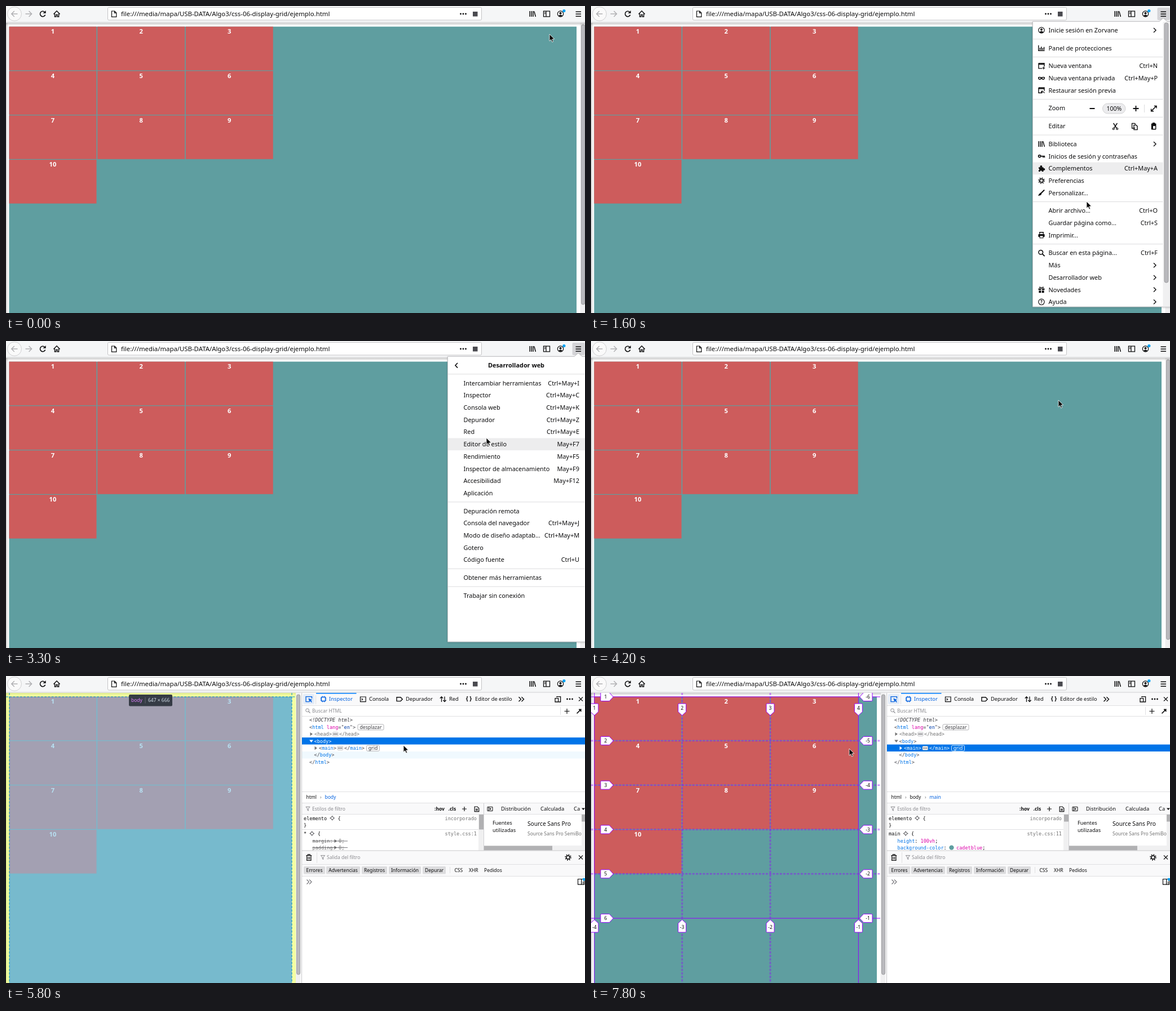
Animation, 1027 px wide and 545 px high, one loop 8 s. Source, as an HTML page:

```html
<!DOCTYPE html>
<html lang="es">
<head>
<meta charset="utf-8">
<title>Inspector de cuadrícula</title>
<style>
html, body { margin: 0; width: 100%; height: 100%; overflow: hidden; background: #fff; }
svg { display: block; width: 1027px; height: 545px; }
text { font-family: "Noto Sans", sans-serif; white-space: pre; }
.mono { font-family: "DejaVu Sans Mono", monospace; }
</style>
</head>
<body>
<svg id="stage" viewBox="0 0 1027 545" xmlns="http://www.w3.org/2000/svg"></svg>
<script>
const INK = '#0c0c0d', GREY = '#737373', BLUE = '#0060df', TAG = '#0074e8', PINK = '#dd00a9', LINE = '#e0e0e2';
const TEAL = '#5f9ea0', RED = '#cd5c5c', PURPLE = '#9400ff', DASH = 'stroke-dasharray="3.9 2.3"';
const PX = 156.6, PY = 78.8;

const range = (n, fn) => Array.from({ length: n }, (_, i) => fn(i)).join('');
const esc = s => s.replace(/&/g, '&amp;').replace(/</g, '&lt;');
const rect = (x, y, w, h, fill, extra = '') => `<rect x="${x}" y="${y}" width="${w}" height="${h}" fill="${fill}" ${extra}/>`;
const path = (d, w = 1.2, color = INK, extra = '') => `<path d="${d}" fill="none" stroke="${color}" stroke-width="${w}" ${extra}/>`;
const solid = (d, color = INK) => `<path d="${d}" fill="${color}"/>`;
const ring = (x, y, r, w = 1.2, color = INK) => `<circle cx="${x}" cy="${y}" r="${r}" fill="none" stroke="${color}" stroke-width="${w}"/>`;
const dot = (x, y, r, color = INK) => `<circle cx="${x}" cy="${y}" r="${r}" fill="${color}"/>`;
const at = (x, y, body) => `<g transform="translate(${x} ${y})">${body}</g>`;
const group = (id, body, extra = '') => `<g id="${id}" ${extra}>${body}</g>`;
// y is the middle of the line
const text = (x, y, s, size, color = INK, extra = '') =>
  `<text x="${x}" y="${y + size * .36}" font-size="${size}" fill="${color}" ${extra}>${esc(s)}</text>`;
const mono = (x, y, parts, extra = '') =>
  `<text class="mono" x="${x}" y="${y + 3}" font-size="8.53" ${extra}>` +
  parts.map(([s, c]) => `<tspan fill="${c}">${esc(s)}</tspan>`).join('') + '</text>';
const END = 'text-anchor="end"', MID = 'text-anchor="middle"', SEMI = 'font-weight="600"';
const dots = (x, y, r = 1.4) => [-4.5, 0, 4.5].map(d => dot(x + d, y, r)).join('');
const cross = (x, y, r = 3.5) => path(`M${x - r} ${y - r}l${2 * r} ${2 * r}m0 ${-2 * r}l${-2 * r} ${2 * r}`);
const plus = (x, y, r = 4.5, w = 1.2) => path(`M${x - r} ${y}h${2 * r}M${x} ${y - r}v${2 * r}`, w);

const windowIcon = path('M-5-4.8H5V1M1 4.5H-5V-4.8', 1.4) + path('M-5-3.2H5', 2);
const icon = {
  account: ring(0, 0, 5.2) + dot(0, -1.2, 2) + solid('M-3.6 3.6Q0-.6 3.6 3.6Q0 6 -3.6 3.6'),
  bars: path('M-5.2-5V4.6H5.6', 1.4) + path('M-2.6 3V-.5M-.2 3V-2.5M2.2 3V0M4.6 3V-2', 1.5),
  window: windowIcon + plus(3.8, 3.8, 2.4),
  mask: solid('M-6-1.6Q-4-3.2 0-1.6Q4-3.2 6-1.6Q6 3 3 3Q1 3 0 1.2Q-1 3-3 3Q-6 3-6-1.6') +
    dot(-3, .2, 1.2, '#fff') + dot(3, .2, 1.2, '#fff'),
  restore: windowIcon + path('M5 5Q5 1.8 0 2.4M1.8 .3L-.4 2.4L1.8 4.6'),
  library: path('M-4.8-5V5M-1.8-5V5M1-5V5M2.8-4.6L5.4 5', 1.5),
  key: ring(-3.4, 0, 2, 1.6) + path('M-1.4 0H6M3 0V2.6M5.4 0V2.6', 1.6),
  puzzle: rect(-5, -2, 8.6, 7.6, INK, 'rx=".6"') + dot(-.6, -3.2, 2) + dot(4.4, 1.6, 1.9) + dot(-.8, 5.2, 1.3, '#fff') + dot(-5, 1.6, 1.2, '#fff'),
  gear: ring(0, 0, 3, 1.5) + `<circle r="4.8" fill="none" stroke="${INK}" stroke-width="2" stroke-dasharray="1.6 2.17"/>`,
  brush: path('M5.2-5.2L-1.6 1.6', 2) + solid('M-2-.2L.4 2.2Q-2 5.6-6 5Q-4.4 2-2-.2'),
  printer: rect(-5.6, -1.8, 11.2, 5, INK, 'rx="1"') + path('M-3.2-2V-5H3.2V-2', 1.4) + rect(-3, 1, 6, 4, '#fff', `stroke="${INK}"`),
  search: ring(-1.2, -1.2, 3.8, 1.5) + path('M1.6 1.6L5.6 5.6', 1.9),
  gift: rect(-5.4, -2.2, 4.7, 2.8, INK) + rect(.7, -2.2, 4.7, 2.8, INK) + rect(-4.6, 1.6, 3.9, 4, INK) +
    rect(.7, 1.6, 3.9, 4, INK) + path('M0-2.6Q-4-6-3.4-3.2M0-2.6Q4-6 3.4-3.2', 1.4),
  help: ring(0, 0, 5.2) + text(0, 0, '?', 8, INK, MID + ' ' + SEMI),
};
const chevron = (x, y) => path(`M${x - 2} ${y - 4}l4 4l-4 4`, 1.4);

/* browser toolbar */
const toolbar = rect(0, 0, 1027, 29.5, '#f5f6f7') + path('M0 29H1027', 1, '#cfcfd1') +
  dot(15, 14, 12.4, '#fafafa') + ring(15, 14, 12.4, 1, '#cfcfd1') +
  path('M20.5 14H10M14.8 9L9.8 14L14.8 19', 1.5, '#b0b0b3') +
  path('M34.5 14H45M40.6 9L45.6 14L40.6 19', 1.5, '#b0b0b3') +
  path('M69 11.2A4.7 4.7 0 1 0 69.6 15.6', 1.6) + solid('M70.6 8V13H65.6Z') +
  path('M84.4 14.4L90 8.8L95.6 14.4M86.4 13.6V19H88.8V15.4H91.2V19H93.6V13.6', 1.4) +
  rect(180.5, 2.5, 663, 22.5, '#fff', 'stroke="#c4c4c6" rx="2"') +
  path('M187.5 9H192.6L195.8 12.2V19.4H187.5ZM192.4 9V12.4H195.6', 1.2) +
  text(204, 14.2, 'file:///media/mapa/USB-DATA/Algo3/css-06-display-grid/ejemplo.html', 11.36) +
  dots(811, 14) + rect(828, 10, 8.5, 8.5, '#4a4a4f') +
  at(934, 14, icon.library) +
  path('M953.5 9.2H964.5V18.8H953.5ZM958 9.2V18.8', 1.3) + path('M955 11.6H957M955 13.6H957', 1) +
  at(983.5, 14, icon.account) + dot(989.8, 8.6, 2.6, '#00a2f4') +
  rect(1004.5, 3, 22, 22, '#d4d4d7', 'id="menuButton" rx="2"') +
  path('M1010.5 10.2H1020M1010.5 14.2H1020M1010.5 18.2H1020', 1.4);

/* page */
const cells = range(10, i => {
  const x = 5.5 + i % 3 * PX, y = 36.6 + Math.floor(i / 3) * PY;
  return rect(x, y, 155, 77.6, RED) + text(x + 77.5, y + 8.4, String(i + 1), 11.2, '#fff', MID + ' ' + SEMI);
});
const scrollbar = x => rect(x, 30, 9, 515, '#f0f0f1') + rect(x + 2, 33, 6.2, 497, '#b9b9bd', 'rx="3" stroke="#939396" stroke-width=".8"');
const pageView = (id, right) => group(id,
  rect(0, 30, right + 15, 515, '#fff') + rect(5.5, 36.6, right - 5.5, 509, TEAL) + cells + scrollbar(right + 6.5));
const shade = rect(0, 30, 4, 515, 'url(#sideShade)') + rect(0, 30, 1027, 5, 'url(#topShade)', 'id="topEdge"');

/* grid lines and numbers */
const rowY = i => Math.max(37, 36.1 + PY * i), colX = i => Math.max(6, 5.2 + 156.4 * i);
const tagShape = (x, y, turn, label) => {
  const [dx, dy] = [[-14.5, 0], [16.5, 0], [0, -13.5], [0, 16]][turn];
  const d = [
    `M${x - 22} ${y - 7.5}h14l7 7.5l-7 7.5h-14q-1.5 0-1.5-1.5v-12q0-1.5 1.5-1.5Z`,
    `M${x + 23} ${y - 7.5}h-14l-7 7.5l7 7.5h14q1.5 0 1.5-1.5v-12q0-1.5-1.5-1.5Z`,
    `M${x - 7} ${y - 20}v13l7 6.5l7-6.5v-13q0-1.5-1.5-1.5h-11q-1.5 0-1.5 1.5Z`,
    `M${x - 7} ${y + 23.5}v-14.5l7-6.5l7 6.5v14.5q0 1.5-1.5 1.5h-11q-1.5 0-1.5-1.5Z`][turn];
  return `<path d="${d}" fill="#fff" stroke="${PURPLE}" stroke-width="1"/>` + text(x + dx, y + dy, label, 8.5, INK, MID);
};
const gridLine = (vertical, p, edge) => {
  const seg = v => vertical ? `M${v} 30V545` : `M0 ${v}H513`;
  return edge ? path(seg(p), 1, PURPLE) : path(seg(p - .8) + seg(p + .8), .8, PURPLE, DASH + ' opacity=".75"');
};
const gridView = group('gridLines',
  range(6, i => gridLine(false, rowY(i), i % 5 === 0)) + range(4, i => gridLine(true, colX(i), i % 3 === 0)) +
  range(6, i => tagShape(40.5, rowY(i), 0, String(i + 1)) + tagShape(474.5, rowY(i), 1, String(i - 6))) +
  range(4, i => tagShape(colX(i), 70.5, 2, String(i + 1)) + tagShape(colX(i), 430, 3, String(i - 4))),
  'clip-path="url(#pageClip)"');

/* element highlighter */
const tip = (x, w, name, kind) => rect(x, 33, w, 20.5, '#353b45', 'rx="2"') +
  text(x + 4, 43, name, 8.5, '#df80ff') + path(`M${x + 29} 37.5v11`, .8, '#6d727a') +
  text(x + 34, 43, '647 × 666', 8.5, '#cdd9e4') +
  (kind ? path(`M${x + 77.5} 37.5v11`, .8, '#6d727a') + text(x + 82.5, 43, kind, 8.5, '#a9aeb5') : '');
const guides = path('M6 30V545M507 30V545M0 37H514', 1, '#0088cc', DASH);
const boxFill = `<g opacity=".6">${rect(6, 37, 501, 508, '#87ceeb')}</g>`;
const bodyMark = group('bodyMark',
  '<path d="M0 30H514V545H507V37H6V545H0Z" fill="#edff64" opacity=".6"/>' + boxFill + guides + tip(218, 77, 'body'));
const mainMark = group('mainMark', boxFill + guides + tip(161.5, 190, 'main', 'Contenedor de cuadricula'));

/* developer tools */
const target = (x, y, color = INK) => ring(x, y, 2.6, 1, color) + path(`M${x - 4.4} ${y}h2.4m4 0h2.4M${x} ${y - 4.4}v2.4m0 4v2.4`, 1, color);
const picker = color => path('M538 45.6H532V36.6H542.5V40', 1.3, color) + solid('M536.4 39.4L543.6 42.4L540.6 43.3L543 46L541.8 47L539.6 44.4L538.4 46.6Z', color);
const funnel = (x, y) => path(`M${x - 3.6} ${y - 3.4}h7.2l-2.8 3.4v3.6l-1.6-1v-2.6Z`, 1, '#8a8a8f');
const tabs = [[573, 'Inspector'], [644, 'Consola'], [709, 'Depurador'], [786, 'Red'], [832, 'Editor de estilo']];
const toolHead = rect(524, 30, 503, 515, '#fff') + path('M524.5 30V545', 1, '#c8c8ca') + rect(525, 30, 502, 22, '#f9f9fa') +
  path('M525 52.5H1027M525 71.5H1027M983.5 55V69', 1, LINE) + rect(550, 30, 71.5, 1.6, '#0a84ff') + path('M549.5 34V50', 1, LINE) +
  tabs.map(([x, s], i) => text(x, 41, s, 9.35, i ? INK : BLUE)).join('') +
  path('M559.5 37.5h7v7h-7Z', 1.4, BLUE) + path('M557.5 39.5h2m-2 3h2m7-3h2m-2 3h2M561.5 35.5v2m3-2v2m-3 7v2m3-2v2', 1, BLUE) +
  path('M628.5 37h9.6v8.6h-9.6ZM630.6 39.6l2 1.8l-2 1.8', 1.2) +
  path('M693 37.8h7l3.2 3.4l-3.2 3.4h-7Z', 1.4) +
  path('M772.5 46V37M769.8 39.6L772.5 36.8L775.2 39.6M778 36.4V45.4M775.3 42.8L778 45.6L780.7 42.8', 1.3) +
  text(821, 40.5, '{ }', 10, INK, MID + ' ' + SEMI) +
  path('M909.5 37.2l4 4l-4 4m5-8l4 4l-4 4', 1.4) +
  path('M977 38V36.6H983.6V46H980.4M974 39.6h5.6v6.4h-5.6Z', 1.3) + dots(1000, 41) + cross(1019.5, 41) +
  ring(534.6, 60.8, 2.9, 1, '#8a8a8f') + path('M536.8 63L539.6 65.8', 1.2, '#8a8a8f') +
  text(543, 62, 'Buscar HTML', 8.5, '#8a8a8f') + plus(995, 62.5) +
  path('M1012.5 66.5L1018 61', 1.6) + path('M1016.4 58.8l4 4M1018.4 60.8l2-2', 2);

const paneBar = rect(525, 0, 502, 105, '#fff') + path('M525 .5H1027M525 20.5H1027M525 40.5H1027', 1, LINE) +
  rect(525, 21, 502, 19, '#f9f9fa') + path('M847.5 21V105', 1, '#d0d0d3') +
  funnel(535.5, 30.6) + text(543, 30.6, 'Estilos de filtro', 8.5, '#8a8a8f') +
  text(760, 30.6, ':hov', 8.5, INK, SEMI) + text(784.5, 30.6, '.cls', 8.5, INK, SEMI) + plus(813, 31, 4) +
  path('M831.2 27H836L838.8 29.8V35.6H831.2ZM833 31.4h4m-4 2h4', 1.2) +
  path('M854 27.5h9v7h-9ZM856.4 27.5v7', 1) + solid('M858 29l3 2l-3 2Z') +
  text(878, 30.8, 'Distribución', 9.3) + text(948, 30.8, 'Calculada', 9.3) + text(1007, 30.8, 'Ca', 9.3) +
  rect(1019.5, 22, 8, 17, '#f9f9fa') + solid('M1021 29.4H1027L1024 33Z');

const emptyPane = group('emptyPane', at(0, 440.5, paneBar) +
  text(863, 492, 'No se usaron fuentes en el elemento act', 9.3, INK, 'font-style="italic"') +
  rect(848, 536.5, 179, 9, '#f0f0f1') + rect(848, 537, 135.5, 8, '#b1b1b3'));

const console_ = rect(525, 310, 502, 235, '#fff') + rect(525, 310.5, 502, 45, '#f9f9fa') +
  path('M525 310H1027', 1, '#c8c8ca') + path('M525 334.5H1027M525 355.5H1027M551.5 313V332', 1, LINE) +
  path('M532.4 318.6h9.8M535.4 318.4v-1.6h3.8v1.6M533.6 319v8.4h7.4v-8.4M536 321v4.6m2.6-4.6v4.6', 1.2) +
  funnel(562, 322) + text(569, 322, 'Salida del filtro', 8.5, '#8a8a8f') + at(997, 322, icon.gear) + cross(1019.5, 322) +
  [[528, 38, 'Errores'], [568, 60, 'Advertencias'], [631, 45, 'Registros'], [679, 57, 'Información'], [739, 41, 'Depurar']]
    .map(([x, w, s]) => rect(x, 338, w, 13.5, '#dcdcde', 'rx="1.5"') + text(x + w / 2, 344.6, s, 8.5, INK, MID)).join('') +
  path('M787.5 339V350', 1, LINE) + text(795.5, 344.6, 'CSS', 8.5) + text(821, 344.6, 'XHR', 8.5) + text(848, 344.6, 'Pedidos', 8.5);

const filledPane = group('filledPane', at(0, 205, paneBar) +
  text(532.5, 215.4, 'html', 8.5) + text(557, 215.4, '›', 8.5, GREY) + rect(838, 246, 9, 64, '#f0f0f1') +
  rect(1021, 246, 6, 55, '#f0f0f1') + rect(1021, 246, 6, 12.5, '#b1b1b3') +
  rect(848, 301, 179, 9, '#f0f0f1') + rect(848, 301.5, 121, 8, '#b1b1b3') + console_);
const fontsInfo = group('fontsInfo', text(863, 260.6, 'Fuentes', 9.3) + text(863, 273.6, 'utilizadas', 9.3) +
  text(925, 262, 'Source Sans Pro', 10.2) +
  `<g clip-path="url(#fontClip)">${text(925, 279.8, 'Source Sans Pro SemiBold', 8.45, GREY)}</g>` +
  path('M533.5 361.5l4 4l-4 4m4.5-8l4 4l-4 4', 1.2, '#75757a') +
  path('M1014.5 360.5h11v9.6h-11ZM1020.6 360.5v9.6M1022.4 366h2m-2 2h2', 1.2) + dot(1025, 361, 2.4, '#00a2f4'));

const rowAt = i => 78.2 + 12.45 * i;
const tag = (s, color) => s.split(/(<\/?|>)/).filter(Boolean).map(p => [p, color || (/[<>]/.test(p) ? '#45454d' : TAG)]);
const badge = (x, y, w, s, fill, ink, edge) =>
  rect(x, y - 4.8, w, 10, fill, `rx="2" stroke="${edge}" stroke-width=".8"`) + text(x + w / 2, y, s, 8.6, ink, MID);
const more = (x, y) => rect(x, y - 3.4, 9.6, 7, '#ececee', 'rx="1.5" stroke="#b1b1b3" stroke-width=".6"') +
  [2.3, 4.8, 7.3].map(d => dot(x + d, y, .8)).join('');
const twisty = (x, y, open, color = GREY) => solid(open ? `M${x - 3.4} ${y - 2}h6.8l-3.4 4.4Z` : `M${x - 2} ${y - 3.2}v6.4l4.4-3.2Z`, color);
const selector = (y, name, src) => mono(528, y, [[name, INK]]) + target(534 + name.length * 5.13 + 3.6, y - .4, '#55555a') +
  mono(528 + name.length * 5.13 + 19.5, y, [['{', INK]]) + mono(835, y, [[src, GREY]], END);
const struck = (y, name) => mono(543.5, y, [[name + ':', GREY]]) + twisty(584.5, y, false) + mono(590, y, [['0;', GREY]]) + path(`M543.5 ${y}H606`, .8, '#55555a');

const tree = (id, main) => {
  const y = rowAt, pickedRow = main ? 4 : 3, white = i => i === pickedRow && '#fff';
  return group(id,
    rect(525, y(pickedRow) - 6.4, 502, 12.4, TAG) + (main ? '' : rect(525, y(5) - 6.4, 502, 12.4, '#f0f9fe')) +
    mono(538, y(0), [['<!DOCTYPE html>', '#38383d']], 'font-style="italic"') +
    mono(538, y(1), [['<', '#45454d'], ['html', TAG], [' lang', PINK], ['="', '#45454d'], ['en', '#003eaa'], ['">', '#45454d']]) +
    badge(624, y(1), 46, 'desplazar', '#fff', '#38383d', '#a0a0a4') +
    twisty(541.5, y(2)) + mono(547, y(2), tag('<head>', GREY)) + mono(591, y(2), tag('</head>', GREY)) + more(579.5, y(2)) +
    twisty(541.5, y(3), true, white(3) || GREY) + mono(546.5, y(3), tag('<body>', white(3))) +
    twisty(549.5, y(4), false, white(4) || GREY) + mono(555, y(4), tag('<main>', white(4))) + more(588, y(4)) +
    mono(600, y(4), tag('</main>', white(4))) +
    (main ? '' : badge(639.5, y(4), 23, 'grid', '#fff', '#38383d', '#a0a0a4')) +
    mono(546.5, y(5), tag('</body>')) + mono(538, y(6), tag('</html>')) +
    text(565.5, 215.4, 'body', 8.5, main ? INK : BLUE) + (main ? text(592, 215.4, '›', 8.5, GREY) + text(600.5, 215.4, 'main', 8.5, BLUE) : '') +
    rect(839, 246, 8, main ? 12.5 : 26.5, '#b1b1b3') +
    selector(252.6, 'elemento', 'incorporado') + mono(528, 265, [['}', INK]]) + path('M525 272.5H838', 1, LINE) +
    `<g clip-path="url(#ruleClip)">` + (main
      ? selector(280, 'main', 'style.css:11') + mono(543.5, 293, [['height', TAG], [': ', INK], ['100vh', PINK], [';', INK]]) +
        mono(543.5, 304.6, [['background-color', TAG], [':', INK]]) + dot(639.5, 304.6, 4.2, TEAL) + mono(648, 304.6, [['cadetblue', PINK], [';', INK]])
      : selector(280, '*', 'style.css:1') + struck(293, 'margin') + struck(304.6, 'padding')) + '</g>');
};
const tools = group('tools', toolHead + group('pickerOff', picker(INK)) +
  group('pickerOn', rect(527, 32, 20, 18, '#e4ecf7', 'rx="2"') + picker(BLUE)) + emptyPane + filledPane + fontsInfo +
  tree('treeBody', false) + tree('treeMain', true) +
  group('badgeOff', badge(639.5, rowAt(4), 23, 'grid', '#fff', '#38383d', '#fff')) +
  group('badgeOn', badge(639.5, rowAt(4), 23, 'grid', TAG, '#fff', '#fff')));

/* application menu: [label, shortcut or '>', icon]; null is a separator */
const mainItems = [['Inicie sesión en Zorvane', '>', 'account'], null, ['Panel de protecciones', '', 'bars'], null,
  ['Nueva ventana', 'Ctrl+N', 'window'], ['Nueva ventana privada', 'Ctrl+May+P', 'mask'], ['Restaurar sesión previa', '', 'restore'], null,
  ['Zoom'], null, ['Editar'], null, ['Biblioteca', '>', 'library'], ['Inicios de sesión y contraseñas', '', 'key'],
  ['Complementos', 'Ctrl+May+A', 'puzzle'], ['Preferencias', '', 'gear'], ['Personalizar...', '', 'brush'], null,
  ['Abrir archivo...', 'Ctrl+O'], ['Guardar página como...', 'Ctrl+S'], ['Imprimir...', '', 'printer'], null,
  ['Buscar en esta página...', 'Ctrl+F', 'search'], ['Más', '>'], ['Desarrollador web', '>'], ['Novedades', '>', 'gift'], ['Ayuda', '>', 'help']];
const devItems = [[''], null, ['Intercambiar herramientas', 'Ctrl+May+I'], ['Inspector', 'Ctrl+May+C'], ['Consola web', 'Ctrl+May+K'],
  ['Depurador', 'Ctrl+May+Z'], ['Red', 'Ctrl+May+E'], ['Editor de estilo', 'May+F7'], ['Rendimiento', 'May+F5'],
  ['Inspector de almacenamiento', 'May+F9'], ['Accesibilidad', 'May+F12'], ['Aplicación'], null, ['Depuración remota'],
  ['Consola del navegador', 'Ctrl+May+J'], ['Modo de diseño adaptab...', 'Ctrl+May+M'], ['Gotero'], ['Código fuente', 'Ctrl+U'], null,
  ['Obtener más herramientas'], null, ['Trabajar sin conexión']];
const menuList = (items, right) => {
  let y = 43 - 21.7;
  return items.map(item => {
    if (!item) {
      y += 10;
      return path(`M784 ${y + 5.8}H${right}`, 1, '#dcdcde');
    }
    y += 21.7;
    const [label, key, name] = item;
    return text(811.5, y, label, 10.88) + (name ? at(799, y, icon[name]) : '') +
      (key === '>' ? chevron(1000, y) : key ? text(right - 9, y, key, 10.88, INK, END) : '');
  }).join('');
};
const zoomRow = path('M884.5 182h9', 1.8) + rect(907.5, 173, 40.5, 18, '#ececee', 'rx="9" stroke="#c8c8ca" stroke-width=".8"') +
  text(927.8, 182, '100%', 10.5, INK, MID) + plus(966.5, 182, 5, 1.8) + path('M981.5 175V189', 1, '#dcdcde') +
  path('M994 186.4L1002.6 177.8M998.8 177.4H1003V181.6M993.6 182.4V186.8H998', 1.5);
const editRow = path('M926.6 208L932.4 217M933.4 208L927.6 217', 1.4) + ring(926.8, 218, 1.5, 1.2) + ring(933.2, 218, 1.5, 1.2) +
  path('M965 217H959.6V208.4H964.4L966 210M963 211.4H967L969 213.4V219.6H963Z', 1.4) +
  rect(993.8, 208.4, 8.6, 11, INK, 'rx="1"') + rect(996, 207, 4.2, 3, INK) + rect(997, 213, 4, 5, '#fff');
const menu = group('menu',
  '<path d="M783.5 27.5H1008L1015 21.5L1022 27.5H1028V534H783.5Z" fill="#fff" stroke="#c2c2c5" filter="url(#soft)"/>' +
  `<g clip-path="url(#menuClip)">` + rect(784, 0, 230.5, 21.7, '#ededee', 'id="hover"') +
  group('mainMenu', menuList(mainItems, 1014) + zoomRow + editRow +
    rect(1014.5, 28, 13, 506, '#f0f0f1') + rect(1017, 30, 7, 461, '#b9b9bd', 'rx="3" stroke="#939396" stroke-width=".8"')) +
  group('devMenu', path('M801 39l-4 4.3l4 4.3', 1.6) + text(905, 43, 'Desarrollador web', 10.88, INK, MID + ' ' + SEMI) + menuList(devItems, 1026)) + '</g>');

const pointerShape = d => `<path d="${d}" fill="#0a0a0a" stroke="#fff" stroke-width=".8"/>`;
const cursor = group('cursor',
  group('arrow', pointerShape('M0 0V12.2L2.8 9.6L4.7 14L6.7 13.2L4.9 8.9L8.7 8.6Z')) +
  group('hand', pointerShape('M-1 1Q0-.8 1 1V4.6L6 5.6Q7.2 6 7 7.6L6 11.8H-.2L-3.8 7.4Q-4 5.8-2.4 6.2L-1 7.4Z')));
const clip = (id, x, y, w, h) => `<clipPath id="${id}">${rect(x, y, w, h, '#000')}</clipPath>`;
const fade = (id, dir) => `<linearGradient id="${id}" x2="${dir ? 0 : 1}" y2="${dir}"><stop stop-opacity=".2"/><stop offset="1" stop-opacity="0"/></linearGradient>`;

document.getElementById('stage').innerHTML =
  '<defs>' + clip('pageClip', 0, 30, 514, 515) + clip('menuClip', 784, 28, 243, 505.5) + clip('ruleClip', 525, 246, 313, 63.5) +
  clip('fontClip', 848, 246, 173, 55) + fade('sideShade', 0) + fade('topShade', 1) +
  '<filter id="soft" x="-5%" y="-5%" width="110%" height="110%"><feDropShadow dx="0" dy="1" stdDeviation="1.5" flood-opacity=".2"/></filter></defs>' +
  rect(0, 0, 1027, 545, '#fff') + pageView('wide', 1012) + pageView('narrow', 507) + shade + gridView + bodyMark + mainMark +
  tools + toolbar + menu + cursor;

/* timeline */
const el = {};
document.querySelectorAll('[id]').forEach(n => el[n.id] = n);
const show = (id, on) => el[id].style.display = on ? '' : 'none';
const last = (list, t) => list.filter(k => k[0] <= t).pop();

// [time, x, y]; a fourth value glides there from the previous stop
const moves = [[0, 964, 50], [700, 1015, 18, 1], [900, 1014, 19], [1400, 985, 110], [1500, 908, 288], [1600, 879, 347], [2200, 880, 481, 1],
  [3100, 864, 414], [3300, 852, 172], [3400, 848, 127], [3600, 838, 114], [3700, 829, 105], [5300, 820, 106], [5500, 744, 115],
  [5700, 724, 118], [5800, 705, 123], [6000, 688, 126], [6100, 670, 127], [6200, 658, 127], [7600, 657, 126], [7800, 458, 129]];
const hovers = [[0, 0], [1500, 128.1], [1600, 288.3], [1700, 363.4], [1800, 385.1], [1900, 438.5], [2000, 460.2], [2100, 481.9],
  [2800, 0], [3100, 388.5], [3300, 183.2], [3400, 118.1], [3600, 96.4]];

function pointer(t) {
  const now = last(moves, t), next = moves[moves.indexOf(now) + 1];
  if (!next || !next[3]) return [now[1], now[2]];
  const p = (t - now[0]) / (next[0] - now[0]), e = p * p * (3 - 2 * p);
  return [1, 2].map(k => now[k] + (next[k] - now[k]) * e);
}

function draw(ms) {
  const t = Math.floor(ms / 100) * 100, from = (a, b = 8000) => t >= a && t < b;
  el.cursor.setAttribute('transform', `translate(${pointer(t).map(v => v.toFixed(1))})`);
  show('hand', from(6200, 7800));
  show('arrow', !from(6200, 7800));

  show('menuButton', from(600, 4200));
  el.menuButton.setAttribute('opacity', from(1100, 4100) ? 1 : .6);
  show('menu', from(1100, 4100));
  el.menu.setAttribute('opacity', from(4000) ? .5 : 1);
  show('mainMenu', from(1100, 2900));
  show('devMenu', from(2800, 4100));
  const slide = from(2800, 2900) ? 120 : 0;
  el.mainMenu.setAttribute('transform', `translate(${slide ? slide - 243 : 0})`);
  el.devMenu.setAttribute('transform', `translate(${slide})`);
  const y = last(hovers, t)[1];
  show('hover', y > 0);
  el.hover.setAttribute('y', y - 10.8);
  el.hover.setAttribute('width', from(2800) ? 243 : 230.5);

  show('wide', from(0, 4800));
  show('narrow', from(4800));
  el.topEdge.setAttribute('width', from(4800) ? 514 : 1027);
  show('tools', from(4800));
  show('emptyPane', from(4800, 5000));
  show('filledPane', from(5000));
  show('treeBody', from(5100, 6700));
  show('treeMain', from(6700));
  show('fontsInfo', from(5500));
  show('pickerOff', from(4800, 5500));
  show('pickerOn', from(5500));
  show('badgeOff', from(6700, 6900));
  show('badgeOn', from(6900));
  show('bodyMark', from(5700, 6000));
  show('mainMark', from(6000, 7600));
  show('gridLines', from(7300));
}

const start = performance.now();
function tick() {
  draw((performance.now() - start) % 8000);
  requestAnimationFrame(tick);
}
tick();
</script>
</body>
</html>
```
